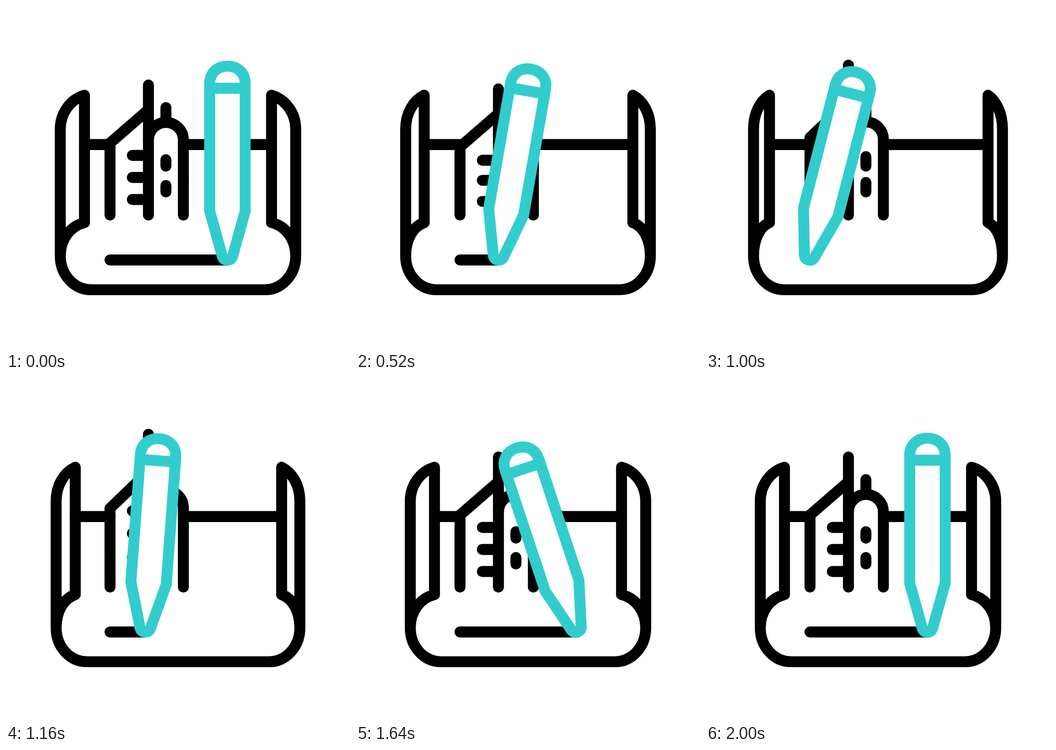
Animation, 640 px wide and 640 px high, one loop 2200 ms. Source, as an HTML page:

```html
<!DOCTYPE html>
<html lang="en">
<head>
<meta charset="utf-8">
<title>Drawing a blueprint</title>
<style>
  html, body { margin: 0; width: 100%; height: 100%; overflow: hidden; background: #fff; }
  svg { display: block; width: 100vw; height: 100vh; }
  path { fill: none; stroke: #000; stroke-width: 20.4; stroke-linecap: round; stroke-linejoin: round; }
  #pencil path { stroke: #33cccc; stroke-linejoin: miter; stroke-linecap: butt; }
  #pencil .body { fill: #fff; }
</style>
</head>
<body>
<svg viewBox="0 0 640 640">
  <path id="paper"/>
  <path id="horizon"/>
  <path id="tower"/>
  <path id="house"/>
  <path id="line"/>
  <g id="pencil">
    <path class="body" d="M-33-91V-328C-33-349-18-360.500 0-360.500S33-349 33-328V-91L9.500-6.500Q7 0 0 0T-9.500-6.500Z"/>
    <path d="M-33-319.500H33"/>
  </g>
</svg>
<script>
const LOOP = 2200, STEP = 40, LEAD = 5, LAST = 45;
const $ = id => document.getElementById(id);
const clamp = (x, lo, hi) => Math.min(hi, Math.max(lo, x));

// Ease with a chosen starting speed and a soft stop.
const soft = (t, speed = 0) => speed * t * (1 - t) ** 2 + t * t * (3 - 2 * t);
const cubic = t => t < .5 ? 4 * t ** 3 : 1 - 4 * (1 - t) ** 3;
const part = (n, from, to, ease = soft) => ease(clamp((n - from) / (to - from), 0, 1));

// Moves that sink, then stretch upward, then settle.
const bounce = (n, [a, b, c, d]) => {
  const sink = part(n, a, b), rise = part(n, b, c), settle = part(n, c, d);
  return (down, up) => sink * (1 - rise) * down - rise * (1 - settle) * up;
};

// One side of the scroll; x runs through fx so the right side can be mirrored.
function side(outer, inner, fx) {
  const w = inner - outer, p = (x, y) => `${fx(x)},${y} `;
  return `M${p(inner, 403)}L${p(inner, 166)}` +
    `C${p(inner - .6 * w, 174 + .2 * (45 - w))}${p(outer, 200)}${p(outer, 229)}` +
    `L${p(outer, 465)}C${p(outer, 500)}${p(outer + 26, 527.9)}${p(outer + 57, 527.9)}L320,527.9` +
    `M${p(inner, 403)}C${p(inner - .6 * w, 410)}${p(outer, 434)}${p(outer, 465)}`;
}

function draw(n) {
  const roll = part(n, 0, 16.5, t => soft(t, 1.25)) - part(n, 17.8, 31.5);
  const outer = 101 - 13.5 * roll, left = 146 - 30 * roll, right = 146 - 33 * roll;
  $('paper').setAttribute('d', side(outer, left, x => x) + side(outer, right, x => 640 - x));
  $('horizon').setAttribute('d', `M${left},257.700H193.500M330,257.700H${640 - right}`);

  const t = bounce(n, [0, 10, 23, 31.5]);
  const sills = [[278, 10, 32], [319, 6, 31], [360, 4, 27]]
    .map(([y, down, up]) => `M235,${y + t(down, up)}H265`).join('');
  $('tower').setAttribute('d',
    `M193.500,389V${255 + t(8, 13)}L265,${193 + t(8, 20)}M265,389V${147 + t(8, 44)}${sills}`);

  const h = bounce(n, [4, 13, 25, 35]);
  const arch = 249 + h(11, 8);
  const dots = [286, 334]
    .map(y => `M297.500,${y + h(11, 16)}V${y + 12 + h(11, 6.6)}`).join('');
  $('house').setAttribute('d',
    `M265,${arch}a32.500,32.500 0 0 1 65,0V389M297.500,${arch - 32.5}V${189 + h(11, 25)}${dots}`);

  const out = part(n, 0, 14, t => soft(t, .5)), back = part(n, 19, 32.3);
  const tip = 412 - 225 * (out - back);
  const tilt = 15 * out - 33.8 * back + 18.8 * part(n, 34, 45, cubic);
  $('line').setAttribute('d', tip > 193.5 ? `M193.500,472.500H${tip}` : '');
  $('pencil').setAttribute('transform', `translate(${tip} 472.5) rotate(${tilt})`);
}

const start = performance.now();
function tick() {
  const time = (performance.now() - start) % LOOP;
  draw(clamp(Math.floor(time / STEP) - LEAD, 0, LAST));
  requestAnimationFrame(tick);
}
tick();
</script>
</body>
</html>
```
